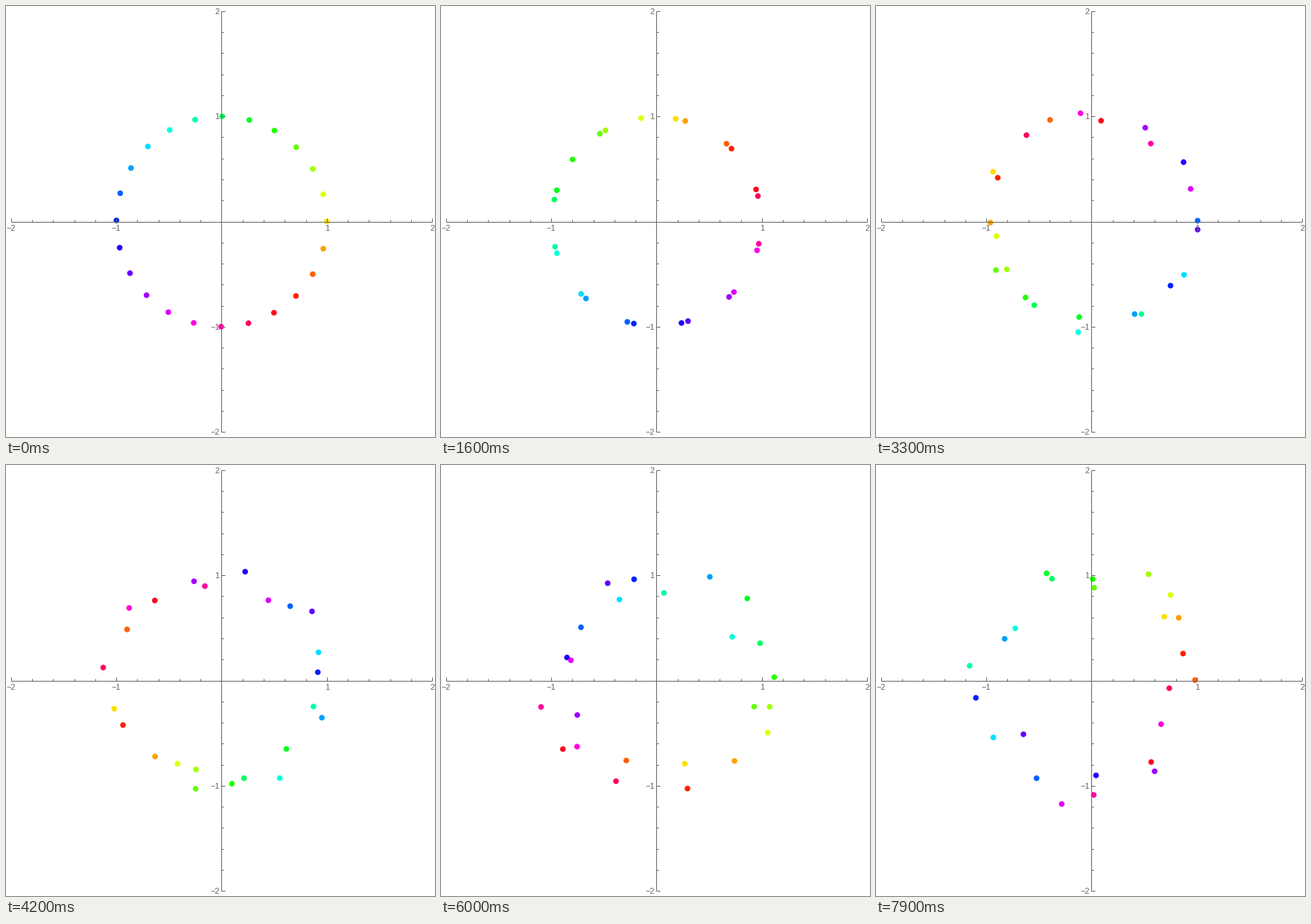
Write a matplotlib script that moves like this. It is 576 by 579 pixels and loops after 8000 ms.

```python
import colorsys

import numpy as np
import matplotlib.pyplot as plt
from matplotlib.animation import FuncAnimation

W, H, DPI = 576, 579, 100
C, UNIT = 289.5, 141.3          # plot centre and one axis unit, in pixels
AX, AY = C - 0.3, C + 0.3       # keeps the snapped axes on the centre pixel
N, FRAMES, STEP = 24, 80, 100
SPIN = 52.5                     # mean orbital speed, degrees per second
FLAW = 2.5                      # place in the ring where the pattern breaks
GRAY = "#666666"

k = np.arange(N)
slot = k * 360 / N
side = np.where(k % 2, 1, -1)   # odd bodies run ahead, even ones fall behind
dist = np.abs((k - FLAW + N / 2) % N - N / 2)
hues = [colorsys.hsv_to_rgb((0.1458 + i / N) % 1, 1, 1) for i in k]

rng = np.random.default_rng(7)
wobble = rng.uniform(0.08, 0.25, N)
phase = rng.uniform(0, 2 * np.pi, N)


def softplus(x, s):
    return s * np.log1p(np.exp(x / s))


def smoothstep(u):
    u = np.clip(u, 0, 1)
    return u * u * (3 - 2 * u)


def positions(t):
    # Neighbours pull together, pass each other, then keep their distance
    split = 13.5 * (softplus(t - 1.19, 0.14) - softplus(t - 3.45, 0.2))
    late = max(t - 2.3, 0)
    gap = (1 + 1.2 * np.exp(-late)) * np.exp(-(dist / (1.7 + 0.45 * late)) ** 2)
    lag = 0.23 * t * t * smoothstep(t / 3) + 0.3 * (1 - np.cos(np.radians(slot)))

    # Epicycles: the orbits slowly become eccentric
    ecc = wobble * smoothstep((t - 1.4) / 5)
    turn = np.radians(SPIN * t) + phase
    r = 1 - 0.01 * smoothstep(t - 1) - ecc * np.cos(turn)
    a = np.radians(slot + SPIN * t + side * split * (1 - gap) - lag)
    a += ecc * np.sin(turn)
    return np.column_stack([C + UNIT * r * np.cos(a), C - UNIT * r * np.sin(a)])


fig = plt.figure(figsize=(W / DPI, H / DPI), dpi=DPI, facecolor="white")
ax = fig.add_axes([0, 0, 1, 1])
ax.set(xlim=(0, W), ylim=(H, 0))
ax.axis("off")


def line(xs, ys):
    ax.plot(xs, ys, color=GRAY, lw=0.72, snap=True, zorder=3,
            solid_capstyle="butt")


def label(x, y, text, ha):
    ax.text(x, y, text, color=GRAY, size=11 * 72 / DPI, ha=ha,
            va="center_baseline", family="Liberation Sans", zorder=4)


reach = 2 * UNIT
line([C - reach, C + reach], [AY, AY])
line([AX, AX], [C - reach, C + reach])
for n in range(-10, 11):
    if n == 0:
        continue
    p = n / 5 * UNIT
    size = 4.5 if n % 5 == 0 else 3
    line([C + p, C + p], [AY, AY - size])
    line([AX, AX + size], [C - p, C - p])
    if n % 5 == 0:
        text = str(n // 5).replace("-", "\u2212")
        label(C + p, 298.5, text, "center")
        label(286.5, C - p, text, "right")

dots = ax.scatter(*positions(0).T, s=(7.6 * 72 / DPI) ** 2, c=hues,
                  linewidths=0, zorder=2)


def update(i):
    dots.set_offsets(positions(i * STEP / 1000))
    return (dots,)


anim = FuncAnimation(fig, update, frames=FRAMES, interval=STEP,
                     repeat=True, repeat_delay=0, blit=False)
plt.show()
```
